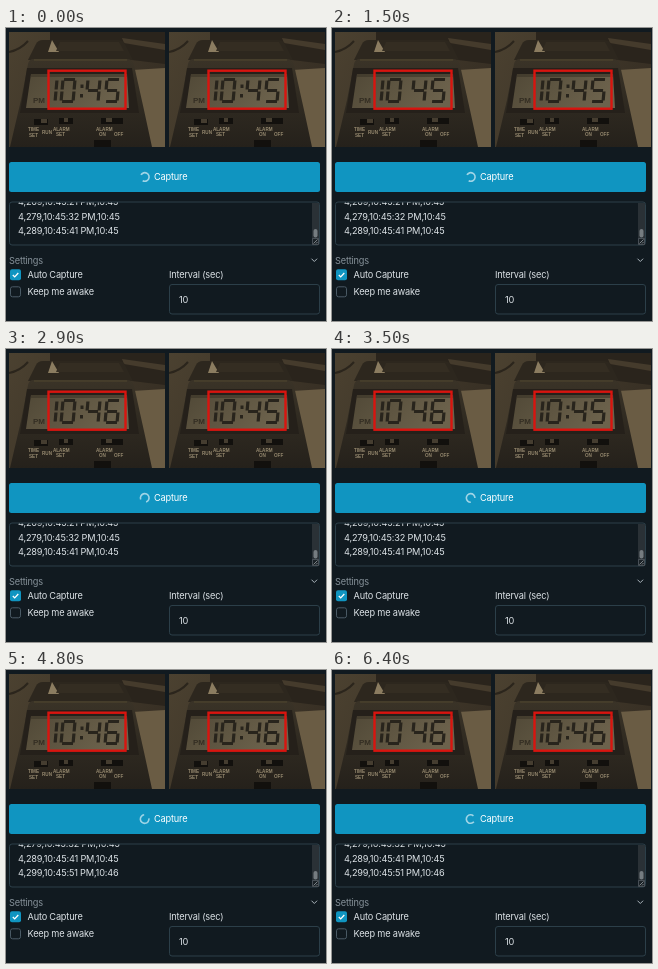
These frames come from a looping animation (320 by 293 pixels, 6500 ms). An HTML page:

```html
<!DOCTYPE html>
<html lang="en">
<head>
<meta charset="utf-8">
<title>Clock capture</title>
<style>
html, body { margin: 0; width: 100%; height: 100%; overflow: hidden; background: #111a20; }
svg { display: block; width: 100%; height: 100%; }
text { font-family: Inter, sans-serif; font-size: 9.2px; letter-spacing: -.02em; fill: #dce2e6; white-space: pre; }
.legend text { font: bold 4.6px "Liberation Sans", Arial, sans-serif; letter-spacing: 0; fill: #978a70; }
.field { fill: #111a20; stroke: #2c3f49; }
.lcd { fill: none; stroke: #28241c; stroke-width: 3.2; }
</style>
</head>
<body>
<svg viewBox="0 0 320 293">
  <defs>
    <linearGradient id="table" x2="1" y2=".4">
      <stop offset="0" stop-color="#4b4130"/><stop offset="1" stop-color="#372f24"/>
    </linearGradient>
    <linearGradient id="body" x2="0" y2="1">
      <stop offset="0" stop-color="#3a3327"/><stop offset="1" stop-color="#25211b"/>
    </linearGradient>
    <linearGradient id="panel" x2="1" y2=".3">
      <stop offset="0" stop-color="#514937"/><stop offset="1" stop-color="#6c624c"/>
    </linearGradient>
    <clipPath id="frame"><path d="M3 4H159V119H3Z"/></clipPath>
    <clipPath id="logBox"><path d="M4 174.5H305V216.5H4Z"/></clipPath>
    <g id="clock" clip-path="url(#frame)">
      <path d="M3 4H159V119H3Z" fill="url(#table)"/>
      <path d="M44 4H159V36L126 32 44 26Z" fill="#2a241c"/>
      <path d="M116 10L159 16V22L118 15Z" fill="#453b2c"/>
      <path d="M126 42L159 40V119H144Z" fill="#6a5c44"/>
      <path d="M22 32L30 16Q32 12 37 12H112Q117 12 119 16L127 32Z" fill="#2d271e"/>
      <path d="M46 12L53 24H42Z" fill="#8b7c60"/>
      <path d="M54 14H113L118 23H50Z" fill="#342d22"/>
      <path d="M3 24Q14 22 22 13" fill="none" stroke="#2b251c" stroke-width="2"/>
      <path d="M22 36Q23 31 28 31H121Q127 31 128 37L138 82 146 119H4L15 72Z" fill="url(#body)"/>
      <path d="M28 32H121" stroke="#51472f"/>
      <path d="M21 40H126L133 85H14Z" fill="#25201a"/>
      <path d="M25 46H121L123 80H20Z" fill="url(#panel)"/>
      <path d="M25 46H121V49H25Z" fill="#3b3427" opacity=".6"/>
      <path d="M28 91H42V97H28ZM53 90H67V96H53ZM95 90H117V96H95ZM88 112H105V119H88Z" fill="#12100d"/>
      <path d="M35 91H41V95H35ZM58 90H62V94H58ZM100 90H106V94H100Z" fill="#453d30"/>
      <g class="legend">
        <text x="22" y="103">TIME</text><text x="23" y="108.5">SET</text>
        <text x="36" y="106">RUN</text>
        <text x="47" y="102.5">ALARM</text><text x="50" y="108">SET</text>
        <text x="90" y="102.5">ALARM</text><text x="93" y="108">ON</text>
        <text x="108" y="108">OFF</text>
      </g>
      <text x="27" y="75" style="font:bold 8px 'Liberation Sans',sans-serif;fill:#342e23">PM</text>
    </g>
  </defs>

  <g><use href="#clock"/><g id="live"></g></g>
  <g transform="translate(160)"><use href="#clock"/><g id="shot"></g></g>
  <g fill="none" stroke="#d9140f" stroke-width="2.4">
    <rect x="42.5" y="42.7" width="77" height="38"/><rect x="202.5" y="42.7" width="77" height="38"/>
  </g>

  <rect id="progress" x="3" y="124" width="311" height="5" rx="2" fill="#23323d"/>
  <rect x="3" y="134" width="311" height="30" rx="2.5" fill="#1095c1"/>
  <path id="spinner" d="M3 -3A4.3 4.3 0 1 0 3 3" fill="none" stroke="#fff" stroke-width="1.6" opacity=".6"/>
  <text x="148" y="152.2" style="fill:#fff">Capture</text>

  <rect class="field" x="3.5" y="174" width="310" height="43" rx="2.5"/>
  <g id="log" clip-path="url(#logBox)"></g>
  <path d="M306 175H313V217H306Z" fill="#2a3136"/>
  <rect x="307.5" y="201" width="4" height="8.5" rx="2" fill="#757c80"/>
  <path d="M306.5 210.5H312.5V216.5H306.5Z" fill="#1b2227" stroke="#596167" stroke-width=".7"/>
  <path d="M307.5 215.5L311.5 211.5M310 215.5L311.5 214" stroke="#a5acb0" stroke-width=".7"/>

  <text x="3" y="235.5" style="fill:#87929a">Settings</text>
  <path d="M305.5 230.7L308.3 233.5 311.1 230.7" fill="none" stroke="#a9b3ba"/>
  <rect x="4" y="241.3" width="11" height="11" rx="2" fill="#1095c1"/>
  <path d="M6.8 247L8.7 248.9 12.3 245" fill="none" stroke="#fff" stroke-width="1.3"/>
  <text x="21.5" y="250">Auto Capture</text>
  <rect class="field" x="4.5" y="258.8" width="10" height="10" rx="2" style="stroke:#4a5a65"/>
  <text x="21.5" y="267">Keep me awake</text>
  <text x="163" y="250">Interval (sec)</text>
  <rect class="field" x="163.5" y="256.5" width="150" height="29.5" rx="2.5"/>
  <text x="173" y="275">10</text>
</svg>
<script>
const LOOP = 6500, BLINK = 960, SPIN = 750;
const MINUTE_AT = 1880, SHOT_AT = 4100, LOGGED_AT = 4500;
const $ = id => document.getElementById(id);

// Segments a-g of a digit cell, 12 wide and 22 tall.
const SEGMENTS = {
  a: "M1 0H12", b: "M12 1V10", c: "M12 12V21", d: "M1 22H12",
  e: "M0 12V21", f: "M0 1V10", g: "M1 11H11"
};
const DIGITS = { 0: "abcdef", 1: "bc", 4: "bcfg", 5: "acdfg", 6: "acdefg" };
const DIGIT_X = [39, 57, 82, 101];

const digit = (value, x) =>
  `<path class="lcd" transform="translate(${x} 51.5) skewX(-5)" d="${[...DIGITS[value]].map(s => SEGMENTS[s]).join("")}"/>`;

const display = (value, colon) =>
  [...value].map((c, i) => digit(c, DIGIT_X[i])).join("") +
  (colon ? '<path d="M74.5 56.5H77.5V60H74.5ZM74 66H77V69.5H74Z" fill="#28241c"/>' : "");

const LOG = ["4,269,10:45:21 PM,10:45", "4,279,10:45:32 PM,10:45",
             "4,289,10:45:41 PM,10:45", "4,299,10:45:51 PM,10:46"];
const logText = first => LOG.slice(first, first + 3)
  .map((line, i) => `<text x="12" y="${177.4 + 14.4 * i}">${line}</text>`).join("");

const shown = {};
function setContent(id, html) {
  if (shown[id] !== html) $(id).innerHTML = shown[id] = html;
}

function draw(now) {
  const t = now % LOOP;
  const colonOn = (t / BLINK + 0.06) % 1 < 0.5;
  setContent("live", display(t < MINUTE_AT ? "1045" : "1046", colonOn));
  setContent("shot", display(t < SHOT_AT ? "1045" : "1046", true));
  setContent("log", logText(t < LOGGED_AT ? 0 : 1));
  $("progress").style.visibility = t >= SHOT_AT && t < LOGGED_AT ? "visible" : "hidden";
  const angle = (t - 4160) / SPIN * 360;
  $("spinner").setAttribute("transform", `translate(138.7 149) rotate(${angle})`);
}

const start = performance.now();
function tick() {
  draw(performance.now() - start);
  requestAnimationFrame(tick);
}
tick();
</script>
</body>
</html>
```
